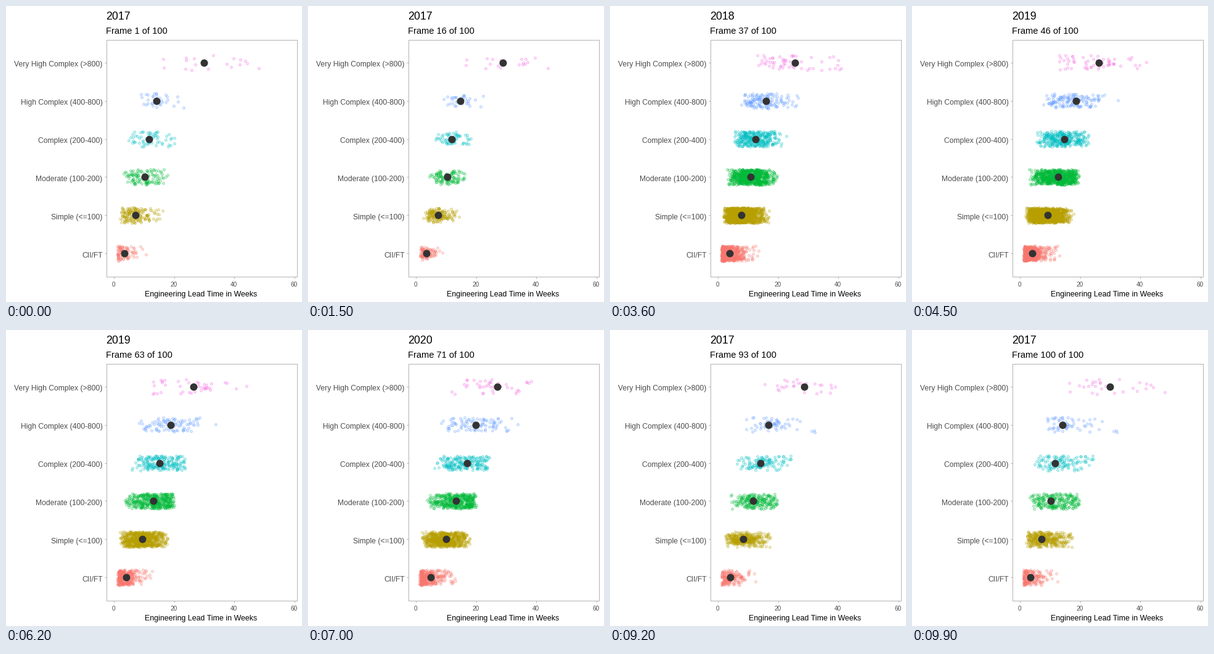
A matplotlib script for the animation above (10000 ms loop, 480 px wide and 480 px high).

```python
import matplotlib.pyplot as plt
import numpy as np
from matplotlib.animation import FuncAnimation
from matplotlib.colors import to_rgba

SIZE, DPI = 480, 72
FRAMES, INTERVAL = 100, 100
LEFT, RIGHT, TOP, BOTTOM = 162.5, 471.5, 54.5, 438.5
X0, PX_WEEK = 175.0, 4.88
PX_ROW = (BOTTOM - TOP) / 6.2
GRAY, LINE = "#4D4D4D", "#B3B3B3"

YEARS = [2017, 2018, 2019, 2020]
STEP = FRAMES // len(YEARS)
HOLD = STEP / 3

# Label, color, number of jobs in the busiest year, mean weeks per year
ROWS = [
    ("CII/FT", "#F8766D", 520, (3.4, 3.95, 4.1, 4.95)),
    ("Simple (<=100)", "#B79F00", 1200, (7.25, 7.85, 9.45, 10.05)),
    ("Moderate (100-200)", "#00BA38", 720, (10.3, 10.9, 13, 13.35)),
    ("Complex (200-400)", "#00BFC4", 320, (11.7, 12.55, 15, 17.25)),
    ("High Complex (400-800)", "#619CFF", 140, (14.2, 16, 18.9, 20)),
    ("Very High Complex (>800)", "#F564E3", 55, (30, 25.6, 26.3, 27.1)),
]
VOLUME = [0.72, 1, 0.92, 0.83]  # yearly exponent applied to the job count

rng = np.random.default_rng(11)


def make_cloud(row, busiest, mean, volume):
    """Jittered lead times: a beta distribution with the given mean."""
    n = round(busiest ** volume)
    lo, hi = 1.2 + 0.4 * row ** 2, 18 + 0.27 * row ** 3
    m = (mean - lo) / (hi - lo)
    a = min(2, 0.9 + row)
    weeks = lo + (hi - lo) * rng.beta(a, a * (1 - m) / m, n)
    height = row + 1 + rng.uniform(-0.2, 0.2, n)
    return np.column_stack([weeks, height])


means = np.array([row[3] for row in ROWS])
clouds = [[make_cloud(r, busiest, m, v) for m, v in zip(avg, VOLUME)]
          for r, (_, _, busiest, avg) in enumerate(ROWS)]

plt.rcParams["font.family"] = "Liberation Sans"
fig = plt.figure(figsize=(SIZE / DPI, SIZE / DPI), dpi=DPI, facecolor="white")
ax = fig.add_axes([LEFT / SIZE, 1 - BOTTOM / SIZE,
                   (RIGHT - LEFT) / SIZE, (BOTTOM - TOP) / SIZE])
ax.set_xlim((LEFT - X0) / PX_WEEK, (RIGHT - X0) / PX_WEEK)
ax.set_ylim(0.4, 6.6)
ax.set_xticks(range(0, 61, 20))
ax.set_yticks(range(1, 7))
ax.tick_params(length=3, width=1, color=LINE,
               labelleft=False, labelbottom=False)
for spine in ax.spines.values():
    spine.set(color=LINE, linewidth=1)


def write(x, y, text, size, color="black", ha="left"):
    return fig.text(x / SIZE, 1 - y / SIZE, text, fontsize=size, color=color,
                    ha=ha, va="baseline")


title = write(162.5, 22, "", 17.8)
subtitle = write(162.5, 45, "", 14.67)
write(316, 471, "Engineering Lead Time in Weeks", 12.35, ha="center")
for weeks in range(0, 61, 20):
    write(X0 - 0.5 + weeks * PX_WEEK, 455, str(weeks), 10, GRAY, "center")

dots = []
for r, (label, color, *_) in enumerate(ROWS):
    write(156.5, 408 - r * PX_ROW, label, 12.1, GRAY, "right")
    dots += ax.plot([], [], "o", ms=4, mew=1,
                    mfc=to_rgba(color, 0.2), mec=to_rgba(color, 0.34))
mean_dots, = ax.plot([], [], "o", ms=12, mfc="#333333", mec="none", zorder=5)


def ease(p):
    return 4 * p ** 3 if p < 0.5 else 1 - 4 * (1 - p) ** 3


def update(i):
    now, t = divmod(i, STEP)
    then = (now + 1) % len(YEARS)
    p = max(0, (t - HOLD) / (STEP - HOLD))
    e = ease(p)

    title.set_text(str(YEARS[now if p < 0.5 else then]))
    subtitle.set_text(f"Frame {i + 1} of {FRAMES}")

    # Paired points travel; surplus ones wait until the next year begins
    for dot, cloud in zip(dots, clouds):
        a, b = cloud[now], cloud[then]
        n = min(len(a), len(b))
        pos = a.copy()
        pos[:n] += (b[:n] - a[:n]) * e
        dot.set_data(pos[:, 0], pos[:, 1])

    avg = means[:, now] + (means[:, then] - means[:, now]) * e
    mean_dots.set_data(avg, range(1, 7))
    return [title, subtitle, *dots, mean_dots]


anim = FuncAnimation(fig, update, frames=FRAMES, interval=INTERVAL,
                     repeat=True, repeat_delay=0, blit=False)
plt.show()
```
